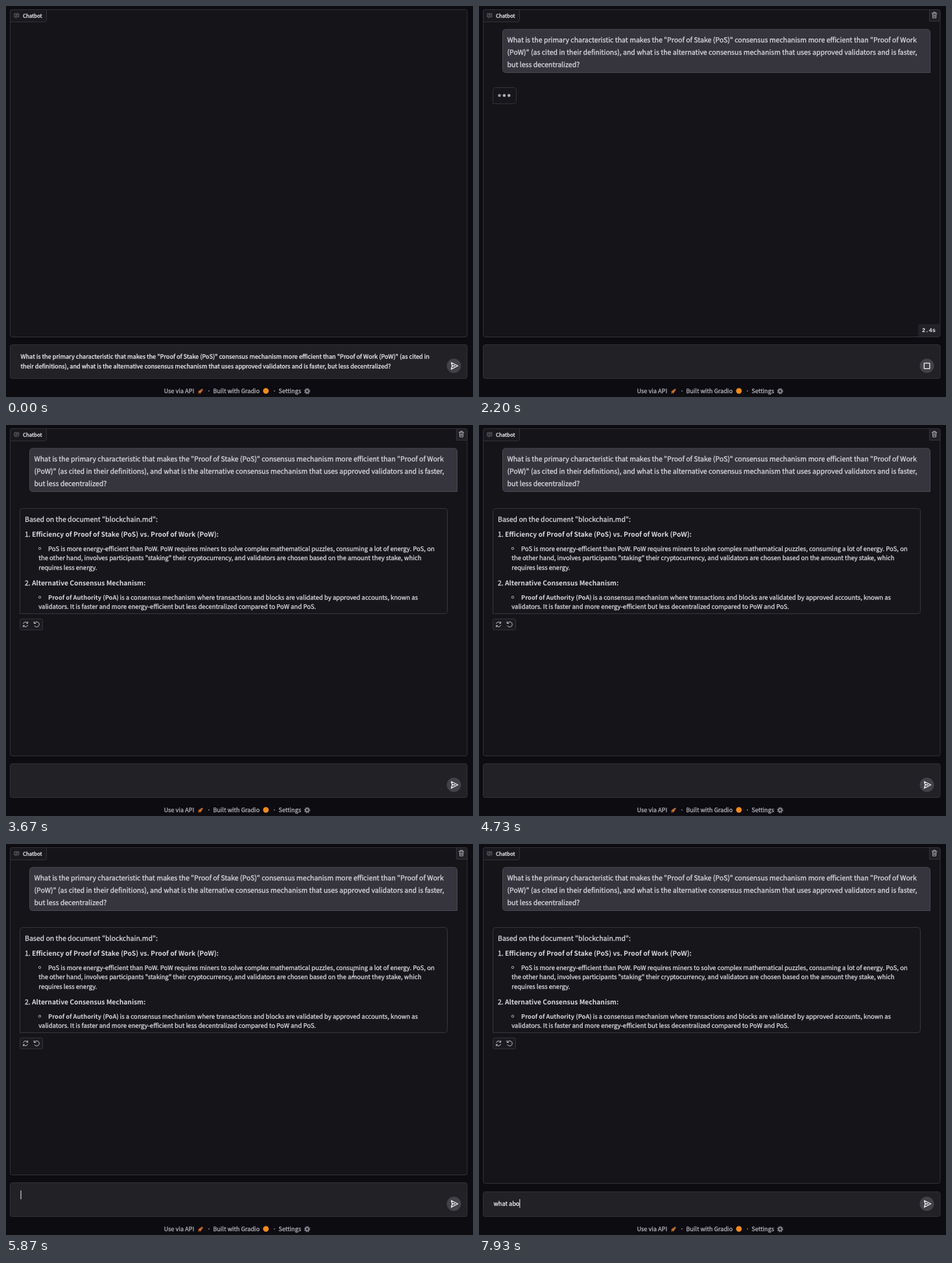
Animation of 720x602 px, one loop 8 s. Source, as an HTML page:

```html
<!DOCTYPE html>
<html lang="en">
<head>
<meta charset="utf-8">
<title>Chatbot</title>
<style>
  html, body { margin: 0; width: 100%; height: 100%; overflow: hidden; background: #0d0c11; }
  svg { display: block; width: 100%; height: 100%; }
  text {
    font-family: "Noto Sans CJK JP", "Noto Sans CJK SC", "Noto Sans CJK", "Open Sans", sans-serif;
    text-rendering: geometricPrecision; white-space: pre;
    stroke-width: .3px; paint-order: stroke;
  }
  .msg text { font-size: 10.53px; fill: #d9d8de; stroke: #d9d8de; }
  .msg .b { font-size: 10.26px; font-weight: 600; stroke: none; }
  .msg .s { font-size: 9.5px; }
  .msg .sb { font-size: 9.27px; font-weight: 600; stroke: none; }
  .in text { font-size: 9.18px; fill: #eeeef1; stroke: #eeeef1; }
  .foot text { font-size: 9.18px; fill: #b3b2ba; stroke: #b3b2ba; }
  .label { font-size: 7.87px; fill: #e6e6ea; stroke: #e6e6ea; }
  .time { font: bold 8.8px "Liberation Mono", monospace; fill: #e6e6ea; }
  .line { fill: none; stroke-linecap: round; stroke-linejoin: round; }
</style>
</head>
<body>
<svg viewBox="0 0 720 602" preserveAspectRatio="none">
  <rect width="720" height="602" fill="#0d0c11"/>
  <g id="page">
    <rect id="panel" x="6.5" y="5.5" width="704.5" height="504" rx="3" fill="#151419" stroke="#333238"/>
    <path d="M6.5 24.5V8.5q0-3 3-3H62.5V21.5q0 3-3 3Z" fill="#1a191e" stroke="#333238"/>
    <g class="line" stroke="#77767f" stroke-width=".8">
      <path d="M13.2 11.8h6.6v5h-3l-1.6 1.6v-1.6h-2zM15 13.5h3.2M15 15.2h2.2"/>
    </g>
    <text class="label" x="26" y="17.8">Chatbot</text>

    <g id="chat" class="msg">
      <path d="M694.5 23.5V5.5H708q3 0 3 3V23.5Z" fill="#202025" stroke="#333238"/>
      <path class="line" stroke="#b9b8c0" stroke-width=".9"
        d="M698.3 11.2h7.6M700.6 11v-1.4h3V11M699.2 11.4l.5 7h4.8l.5-7M701.2 13.2v3.4M703 13.2v3.4"/>
      <path d="M36.5 41q0-5 5-5H690.5q5 0 5 5V102.5H41.5q-5 0-5-5Z" fill="#36353d" stroke="#4b4a53"/>
      <text x="43.5" y="55.5">What is the primary characteristic that makes the "Proof of Stake (PoS)" consensus mechanism more efficient than "Proof of Work</text>
      <text x="43.5" y="74.8">(PoW)" (as cited in their definitions), and what is the alternative consensus mechanism that uses approved validators and is faster,</text>
      <text x="43.5" y="94">but less decentralized?</text>
    </g>

    <g id="pending">
      <path d="M21.5 129.5q0-4 4-4H53.5q4 0 4 4V146.5q0 4-4 4H21.5Z" fill="#17161b" stroke="#333238"/>
      <g id="dots" fill="#b5b4bc">
        <circle cx="31.5" cy="137.7" r="2.3"/>
        <circle cx="38.9" cy="137.7" r="2.3"/>
        <circle cx="46.2" cy="137.7" r="2.3"/>
      </g>
      <path d="M677 509V493q0-3 3-3H710.5V509Z" fill="#232228"/>
      <text id="timer" class="time" x="683" y="501.9"></text>
    </g>

    <g id="reply" class="msg">
      <path d="M21.5 132.5q0-4 4-4H676.5q4 0 4 4V286.5q0 4-4 4H21.5Z" fill="#17161b" stroke="#37363d"/>
      <text x="29" y="148.6">Based on the document "blockchain.md":</text>
      <text x="29" y="172.3">1.</text>
      <text class="b" x="40" y="172.3">Efficiency of Proof of Stake (PoS) vs. Proof of Work (PoW):</text>
      <text class="s" x="65" y="193.5">PoS is more energy-efficient than PoW. PoW requires miners to solve complex mathematical puzzles, consuming a lot of energy. PoS, on</text>
      <text class="s" x="50.3" y="208.2">the other hand, involves participants "staking" their cryptocurrency, and validators are chosen based on the amount they stake, which</text>
      <text class="s" x="50.3" y="223.3">requires less energy.</text>
      <text x="29" y="247.4">2.</text>
      <text class="b" x="40" y="247.4">Alternative Consensus Mechanism:</text>
      <text class="sb" x="65" y="268.7">Proof of Authority (PoA)</text>
      <text class="s" x="175.6" y="268.7">is a consensus mechanism where transactions and blocks are validated by approved accounts, known as</text>
      <text class="s" x="50.3" y="283.4">validators. It is faster and more energy-efficient but less decentralized compared to PoW and PoS.</text>
      <g fill="none" stroke="#d0cfd6" stroke-width=".8">
        <circle cx="52" cy="190" r="1.7"/>
        <circle cx="52" cy="265.2" r="1.7"/>
      </g>
      <rect x="21.5" y="298.5" width="35" height="17" rx="2" fill="#1c1b20" stroke="#333238"/>
      <g class="line" stroke="#c4c3ca">
        <path d="M26.7 305.8a3.5 3.5 0 0 1 6-1.4l.6.7M33.5 303v2.2h-2.2M33.4 308.2a3.5 3.5 0 0 1-6 1.4l-.6-.7M26.6 311v-2.2h2.2"/>
        <path d="M43.6 305.3a4 4 0 1 1 .2 3.8M43.2 302.8v2.7h2.7"/>
      </g>
    </g>

    <g class="in">
      <rect id="box" x="6.5" width="704.5" rx="3" fill="#222126" stroke="#333238"/>
      <g id="draft">
        <text x="22.5" y="543">What is the primary characteristic that makes the "Proof of Stake (PoS)" consensus mechanism more efficient than "Proof of Work (PoW)" (as cited in</text>
        <text x="22.5" y="557.7">their definitions), and what is the alternative consensus mechanism that uses approved validators and is faster, but less decentralized?</text>
      </g>
      <text id="typed" x="22.5" y="557"></text>
      <rect id="caret" width="1" fill="#f4f4f6"/>
      <circle id="disc" cx="690.5" cy="554" r="11"/>
      <g id="icon" class="line" stroke-width="1.3">
        <path id="send" d="M686.5 549L696.7 554L686.5 559.2L688 554ZM688 554H692"/>
        <rect id="stop" x="686.3" y="549.8" width="8.6" height="8.6" rx=".6"/>
      </g>
    </g>

    <g class="foot">
      <text x="243.5" y="596.3">Use via API</text>
      <text x="310.3" y="596.3">·</text>
      <text x="319.2" y="596.3">Built with Gradio</text>
      <text x="411.3" y="596.3">·</text>
      <text x="420.2" y="596.3">Settings</text>
      <g transform="translate(300 593) rotate(45)">
        <path d="M-1.6 1L-3.2 3.6L-1.2 3Z M1.6 1L3.2 3.6L1.2 3Z" fill="#c2410c"/>
        <path d="M0-5Q2.6-2 1.6 2.6H-1.6Q-2.6-2 0-5Z" fill="#d9772b"/>
        <path d="M-1 3H1L0 5.4Z" fill="#f59e0b"/>
        <circle cy="-1.3" r=".9" fill="#5a4a45"/>
      </g>
      <circle cx="400.7" cy="592.6" r="4.4" fill="#f28a1c"/>
      <g fill="none" stroke="#85848d">
        <circle cx="464.3" cy="593" r="3.9" stroke-width="1.6" stroke-dasharray="1.7 1.363"/>
        <circle cx="464.3" cy="593" r="2.4" stroke-width="2"/>
      </g>
    </g>
  </g>

  <g id="cursor">
    <path id="arrow" d="M0 0V10.2L2.4 8L4 11.7L5.7 11L4.1 7.4H7.3Z" fill="#08080a" stroke="#f2f2f2" stroke-width=".8" stroke-linejoin="round"/>
    <path id="hand" d="M-1 .9Q0-.5 1 .9V4.3Q2.6 3.9 3.2 5Q4.8 4.6 5 5.8Q6.3 5.7 6.3 7.2Q6.3 9.7 5 11.5H-.2Q-1.4 9.3-3.3 7.4Q-3.3 5.7-1 7Z" fill="#fff" stroke="#111" stroke-width=".7"/>
    <path id="beam" class="line" d="M-1.8-5.2Q0-5.2 0-3.8Q0-5.2 1.8-5.2M0-3.8V3.8M-1.8 5.2Q0 5.2 0 3.8Q0 5.2 1.8 5.2" stroke="#d6d6da"/>
  </g>
</svg>
<script>
const $ = id => document.getElementById(id);
const LOOP = 8000, SUBMIT = 800, TIMER = 970, REPLY = 3670, TYPE = 7200;
const PROMPT = "what abo";
const KEY_GAP = 104;

// Each visit of the pointer: t, x, y waypoints.
const visits = [
  [[130, 717, 604], [330, 704, 580], [530, 692.5, 559.5], [1200, 692.5, 559.5], [1470, 688, 606]],
  [[5200, 590, 600], [5330, 575, 430], [5470, 545, 235], [5600, 536, 199], [5870, 536, 199],
   [6130, 470, 320], [6400, 391, 496.5], [6530, 380, 548], [TYPE, 380, 548]]
];

const show = (id, on) => $(id).setAttribute("display", on ? "inline" : "none");
const set = (id, attrs) => { for (const k in attrs) $(id).setAttribute(k, attrs[k]); };
const within = (t, a, b) => t >= a && t < b;

function pointerAt(t) {
  const path = visits.find(v => within(t, v[0][0], v[v.length - 1][0]));
  if (!path) return null;
  const i = path.findIndex(p => p[0] > t);
  const [t0, x0, y0] = path[i - 1], [t1, x1, y1] = path[i];
  const k = (t - t0) / (t1 - t0);
  return { x: x0 + (x1 - x0) * k, y: y0 + (y1 - y0) * k };
}

function drawPointer(t) {
  const p = pointerAt(t);
  show("cursor", p);
  if (!p) return false;
  const hover = Math.hypot(p.x - 690.5, p.y - 554) < 11;
  const beam = !hover && (within(t, 5470, 6000) || (t > 6400 && p.y > 521));
  show("hand", hover);
  show("beam", beam);
  show("arrow", !hover && !beam);
  set("cursor", { transform: `translate(${p.x} ${p.y})` });
  return hover;
}

function drawInput(t, hover) {
  const typing = t >= TYPE;
  const top = typing ? 535.5 : 521.5;
  set("box", { y: top, height: 573.5 - top });
  set("panel", { height: typing ? 517 : 504 });
  show("draft", t < SUBMIT);

  const count = typing ? Math.min(PROMPT.length, 1 + Math.floor((t - TYPE) / KEY_GAP)) : 0;
  const typed = $("typed");
  typed.textContent = PROMPT.slice(0, count);
  const width = count ? typed.getComputedTextLength() : 0;
  set("caret", { x: 22.5 + width, y: typing ? 546.8 : 533.5, height: 13.5 });
  const blink = Math.floor((t - 4199) / 266.5) % 2 === 0;
  show("caret", typing || within(t, 3730, 4000) ||
    (within(t, 4199, 6660) && blink) || within(t, 6730, 7000));

  const busy = within(t, SUBMIT, REPLY);
  show("send", !busy);
  show("stop", busy);
  set("disc", { fill: hover ? "#29282d" : "#434248" });
  set("icon", { stroke: hover ? "#8f8e96" : "#f4f4f6" });
}

function drawChat(t) {
  show("chat", t >= SUBMIT);
  show("pending", within(t, SUBMIT, REPLY));
  show("reply", t >= REPLY);
  $("timer").textContent = (Math.floor(Math.max(0, t - TIMER) / 50) / 10).toFixed(1) + "s";
  [...$("dots").children].forEach((dot, i) => {
    const phase = Math.max(0, t - 930 - i * 100) / 750;
    dot.setAttribute("opacity", 0.7 - 0.3 * Math.cos(phase * 2 * Math.PI));
  });
}

function draw(t) {
  set("page", { transform: `translate(0 ${within(t, 5470, 5730) ? -1 : 0})` });
  drawChat(t);
  drawInput(t, drawPointer(t));
}

const start = performance.now();
function tick() {
  draw((performance.now() - start) % LOOP);
  requestAnimationFrame(tick);
}
tick();
</script>
</body>
</html>
```
